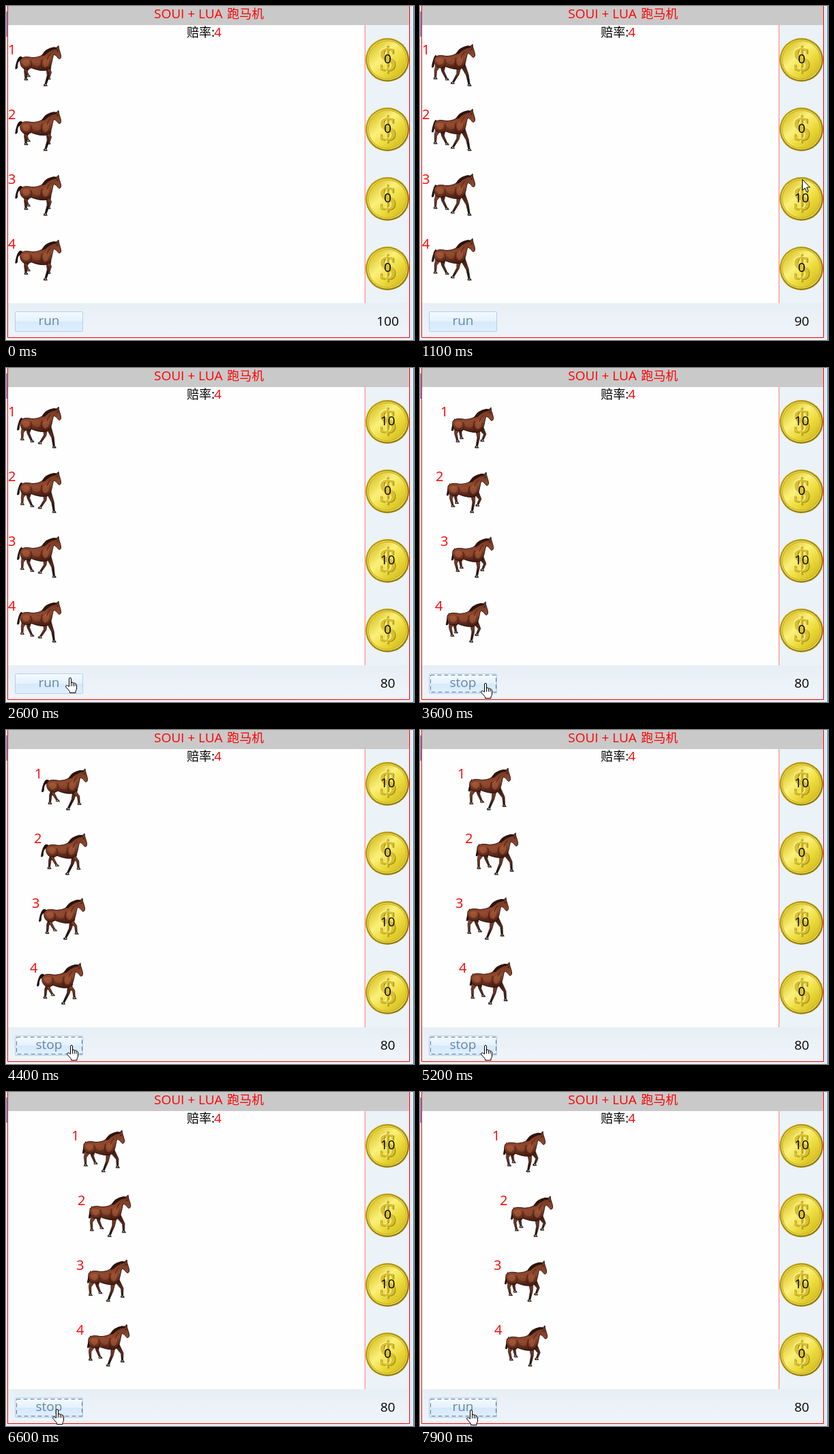
An HTML page that plays this animation: 598x490 px, repeating every 8000 ms.

```html
<!DOCTYPE html>
<html lang="zh">
<head>
<meta charset="utf-8">
<title>SOUI + LUA 跑马机</title>
<style>
  html, body { margin: 0; width: 100%; height: 100%; overflow: hidden; background: #ebf2f8; }
  svg { display: block; width: 598px; height: 490px; }
  text { font-family: "Open Sans", "Noto Sans", "Noto Sans CJK SC", sans-serif; font-size: 19px; }
  .han { font-family: "Noto Sans CJK SC", "Noto Sans CJK JP", sans-serif; font-size: 18px; }
  .red { fill: #f00; }
  .mid { text-anchor: middle; }
  .sign { font: bold 50px "Liberation Serif", "Noto Serif", serif; text-anchor: middle; }
</style>
</head>
<body>
<svg viewBox="0 0 598 490" xmlns="http://www.w3.org/2000/svg">
  <defs>
    <linearGradient id="panel" x2="0" y2="1">
      <stop offset="0" stop-color="#e7eff6"/><stop offset="1" stop-color="#eff4f9"/>
    </linearGradient>
    <linearGradient id="btn" x2="0" y2="1">
      <stop offset="0" stop-color="#f4faff"/><stop offset=".5" stop-color="#e4f1fd"/>
      <stop offset=".52" stop-color="#d6e9fb"/><stop offset="1" stop-color="#e0effd"/>
    </linearGradient>
    <linearGradient id="rim" x2="1" y2="1">
      <stop offset="0" stop-color="#c4a80e"/><stop offset="1" stop-color="#8a7000"/>
    </linearGradient>
    <linearGradient id="face" x2="1" y2="1">
      <stop offset=".1" stop-color="#d9c328"/><stop offset=".4" stop-color="#fbf07a"/>
      <stop offset=".62" stop-color="#ecdc3e"/><stop offset=".9" stop-color="#d3bc20"/>
    </linearGradient>
    <linearGradient id="hide" gradientUnits="userSpaceOnUse" x1="45" y1="60" x2="48" y2="94">
      <stop offset="0" stop-color="#6b3220"/><stop offset=".5" stop-color="#91482d"/><stop offset="1" stop-color="#43190f"/>
    </linearGradient>
    <linearGradient id="near" gradientUnits="userSpaceOnUse" x1="0" y1="88" x2="0" y2="113">
      <stop offset="0" stop-color="#84402a"/><stop offset=".5" stop-color="#69301e"/><stop offset="1" stop-color="#170b07"/>
    </linearGradient>
    <linearGradient id="far" gradientUnits="userSpaceOnUse" x1="0" y1="88" x2="0" y2="110">
      <stop offset="0" stop-color="#421c12"/><stop offset=".5" stop-color="#5b2a1b"/><stop offset="1" stop-color="#170b07"/>
    </linearGradient>
    <g id="coin">
      <circle r="32" fill="url(#rim)"/>
      <circle r="29.6" fill="#f4e868"/>
      <circle r="28" fill="url(#face)" stroke="#bfa51a"/>
      <text class="sign" x="1.2" y="17" fill="#a88e14">$</text>
      <text class="sign" x="-1" y="15" fill="#fff7a0">$</text>
      <text class="sign" x="0" y="16" fill="#d8c032">$</text>
    </g>
    <g id="horse" stroke-linejoin="round" stroke-linecap="round">
      <g id="farLegs" fill="url(#far)" stroke="#170b07" stroke-width=".6"></g>
      <path id="tail" fill="#1f100b"/>
      <g id="nearLegs" fill="url(#near)" stroke="#170b07" stroke-width=".6"></g>
      <g id="body">
        <path d="M21.5 77C25 72 32 73.5 39 74.5C46 74 50 73 54 70C58 66 62 61 70 59.5L74 60L77 57L77.5 61C78.5 65 81 70 80.5 74C80 76.5 77.5 77 76.5 75.5C74.5 72.5 72.5 71 70 70C68.5 73 68 79 66.5 84C65 90 61 93.5 56.5 93.5C49 94 42 91.5 37 89.5C34 92 25 92 23 88C20.5 85 20 80 21.5 77Z" fill="url(#hide)" stroke="#1f0d08" stroke-width=".9"/>
        <path d="M52 72C56 64 62 59 74 60L75 62C68 62 62 66 57 71Z" fill="#2c140c"/>
        <path d="M24 80Q28 75 34 79Q36 84 31 87Q25 88 24 80Z" fill="#b26542" opacity=".55"/>
        <path d="M54 80Q59 73 63 77Q64 86 58 89Q53 87 54 80Z" fill="#b26542" opacity=".55"/>
        <path d="M38 79Q46 77 51 80Q51 86 46 87Q39 86 38 79Z" fill="#a55c3b" opacity=".4"/>
        <path d="M36 89Q39 84 36 79M53 90Q50 84 53 77M65 69Q61 73 60 78" fill="none" stroke="#32140c" opacity=".75"/>
        <circle cx="75.5" cy="64.5" r=".8" fill="#120806"/>
      </g>
    </g>
  </defs>

  <rect width="598" height="490" fill="#ebf2f8"/>
  <rect y="8" width="2" height="37" fill="#7d97cc"/>
  <rect x="592" width="5" height="490" fill="#e2edf7"/>
  <rect x="597" width="1" height="490" fill="#3f78ae"/>
  <rect x="3" width="588" height="28" fill="#c9c9c9"/>
  <rect x="3" y="28" width="523" height="408" fill="#fefefe"/>
  <rect x="3" y="436" width="588" height="50" fill="url(#panel)"/>
  <rect x="525.5" y="28" width="1.5" height="408" fill="#ff9c9c"/>
  <path d="M2.5 0V486.5H591.5V0" fill="none" stroke="#f00"/>
  <text class="red" x="217" y="18">SOUI + LUA <tspan class="han" x="324">跑马机</tspan></text>
  <text x="265" y="45"><tspan class="han">赔率</tspan><tspan x="301">:</tspan><tspan class="red" x="305">4</tspan></text>
  <g id="coins"></g>
  <text id="money" class="mid" x="559.5" y="469"></text>
  <rect x="13.5" y="448.5" width="99" height="29" rx="1.5" fill="url(#btn)" stroke="#b5d0ea"/>
  <rect id="focus" x="15.5" y="450.5" width="96" height="25" fill="none" stroke="#5f7690" stroke-dasharray="6 4"/>
  <text id="label" class="mid" x="63" y="468" fill="#6285a8"></text>
  <g id="track"></g>
  <path id="arrow" fill="#fff" stroke="#000" stroke-linejoin="round" d="M.5 .5V16.5L4.2 13L6.8 18.8L9.2 17.8L6.7 12H11.5Z"/>
  <g id="hand" stroke="#000" stroke-linejoin="round" stroke-linecap="round">
    <path fill="#fff" d="M5.5 13V2Q5.5 .5 7 .5T8.5 2V8.5Q8.7 7 10 7T11.4 8.8Q11.7 7.7 12.8 7.8T14 9.6Q14.5 8.8 15.4 9.2T16.5 11V16Q16.5 18.5 15 20V22.5H6.5V20.5L1 14.2Q.2 12.6 1.3 11.8T3.8 12.2Z"/>
    <path fill="none" d="M8.5 8.5V12.5M11.4 9V12.5M14 10V12.5"/>
  </g>
</svg>
<script>
const $ = id => document.getElementById(id);
const LOOP = 8000, STEP = 100, LANES = [0, 1, 2, 3];
const { PI, sin, cos, max, min, round, floor, hypot } = Math;

const linear = k => k;
const easeOut = k => 1 - (1 - k) ** 2;

// Values between [time, ...values] key points.
function along(keys, t, ease) {
  let i = 0;
  while (i < keys.length - 2 && t >= keys[i + 1][0]) i++;
  const [a, b] = [keys[i], keys[i + 1]];
  const k = ease(min(1, max(0, (t - a[0]) / (b[0] - a[0]))));
  return a.slice(1).map((v, j) => v + (b[j + 1] - v) * k);
}

// Share of the race run so far.
const pace = [[3000, 0], [3600, .215], [3900, .22], [5200, .51], [6600, .925], [7100, 1]];

// Each horse swings ahead of and behind the common pace.
const horses = [
  { reach: 103, lead: 5, swings: 2 },
  { reach: 114, lead: -5, swings: 3 },
  { reach: 105, lead: 5, swings: 3 },
  { reach: 106, lead: -4, swings: 2 }
];
const distance = (h, u) => h.reach * u + h.lead * sin(PI * h.swings * u);

const pointer = [
  [400, 553, 268], [1000, 560, 254], [1100, 560, 254], [1400, 586, 180],
  [1700, 562, 88], [1900, 550, 104], [2100, 378, 284], [2600, 87, 454],
  [3000, 89, 462], [5200, 89, 462], [5700, 67, 463], [7900, 68, 466]
];

const GAIT = .7; // walking cycles per second
const gait = t => .2 + GAIT * (t - 3600) / 1000 + 10;

const hind = { x: 31, hipY: 84, stride: 9, ground: 108, lift: 5, bend: -3, width: 5 };
const fore = { x: 60, hipY: 87, stride: 13, ground: 116.5, lift: 10, bend: 2, width: 3.6 };

const SVG = "http://www.w3.org/2000/svg";
function add(parent, tag, attrs = {}) {
  const el = document.createElementNS(SVG, tag);
  for (const k in attrs) el.setAttribute(k, attrs[k]);
  return parent.appendChild(el);
}

const legs = [hind, fore].flatMap(kind => [
  { ...kind, hipX: kind.x - 2.5, shift: .6, el: add($("nearLegs"), "path") },
  { ...kind, hipX: kind.x + 2.5, shift: .1, el: add($("farLegs"), "path") }
]);
const bets = LANES.map(i => {
  const y = 79 + 102 * i;
  add($("coins"), "use", { href: "#coin", x: 559, y });
  return add($("coins"), "text", { class: "mid", x: 559.5, y: y + 5 });
});
const runners = LANES.map(i => {
  const g = add($("track"), "g");
  add(g, "use", { href: "#horse" });
  add(g, "text", { class: "red", x: 3, y: 71, style: "font-size:20px" }).textContent = i + 1;
  return g;
});

function legPath(hip, knee, hoof, width) {
  const sides = (p, from, to, w) => {
    const dx = to[0] - from[0], dy = to[1] - from[1], n = hypot(dx, dy);
    return [1, -1].map(s => [p[0] - s * dy / n * w, p[1] + s * dx / n * w]);
  };
  const [a, b] = sides(hip, hip, knee, width);
  const [c, d] = sides(knee, hip, hoof, 1.8);
  const [e, f] = sides(hoof, knee, hoof, 1.1);
  const [x, y] = hoof;
  return `M${a}L${c}L${e}L${f}L${d}L${b}Z` +
    `M${x - 1.8} ${y - 1.5}L${x + 1.2} ${y - 2}L${x + 3} ${y + .7}H${x - 2}Z`;
}

function drawLeg(leg, phase, bob) {
  const angle = 2 * PI * (phase + leg.shift);
  const raised = leg.lift * max(0, sin(angle));
  const hip = [leg.hipX, leg.hipY + bob];
  const hoof = [leg.x - leg.stride * cos(angle), leg.ground - raised];
  const knee = [(hip[0] + hoof[0]) / 2 + leg.bend + raised * .3, (hip[1] + hoof[1]) / 2];
  leg.el.setAttribute("d", legPath(hip, knee, hoof, leg.width));
}

function drawHorse(phase) {
  const bob = 1.5 * sin(4 * PI * phase);
  const tip = 17 + 3 * sin(2 * PI * phase);
  const lift = `translate(0 ${bob})`;
  $("body").setAttribute("transform", lift);
  $("tail").setAttribute("transform", lift);
  $("tail").setAttribute("d",
    `M24 74C${tip + 5} 70 ${tip + 1} 77 ${tip - 1} 91Q${tip + 3} 93 ${tip + 3} 86C${tip + 3} 81 20 78 24 78Z`);
  legs.forEach(leg => drawLeg(leg, phase, bob));
}

function place(el, x, y, shown) {
  el.setAttribute("transform", `translate(${round(x)} ${round(y)})`);
  el.style.display = shown ? "" : "none";
}

function draw(time) {
  const t = floor(time % LOOP / STEP) * STEP;

  drawHorse(gait(t));
  const [progress] = along(pace, t, linear);
  runners.forEach((el, i) => place(el, distance(horses[i], progress), 95 * i, true));

  const stake = [t >= 1700 ? 10 : 0, 0, t >= 700 ? 10 : 0, 0];
  bets.forEach((b, i) => b.textContent = stake[i]);
  $("money").textContent = 100 - stake[0] - stake[2];

  $("label").textContent = t >= 3000 && t < 6900 ? "stop" : "run";
  $("focus").style.display = t >= 3000 ? "" : "none";

  const [x, y] = along(pointer, t, easeOut);
  place($("arrow"), x, y, t >= 400 && t < 2500);
  place($("hand"), x, y, t >= 2500);
}

const start = performance.now();
function tick() {
  draw(performance.now() - start);
  requestAnimationFrame(tick);
}
tick();
</script>
</body>
</html>
```
